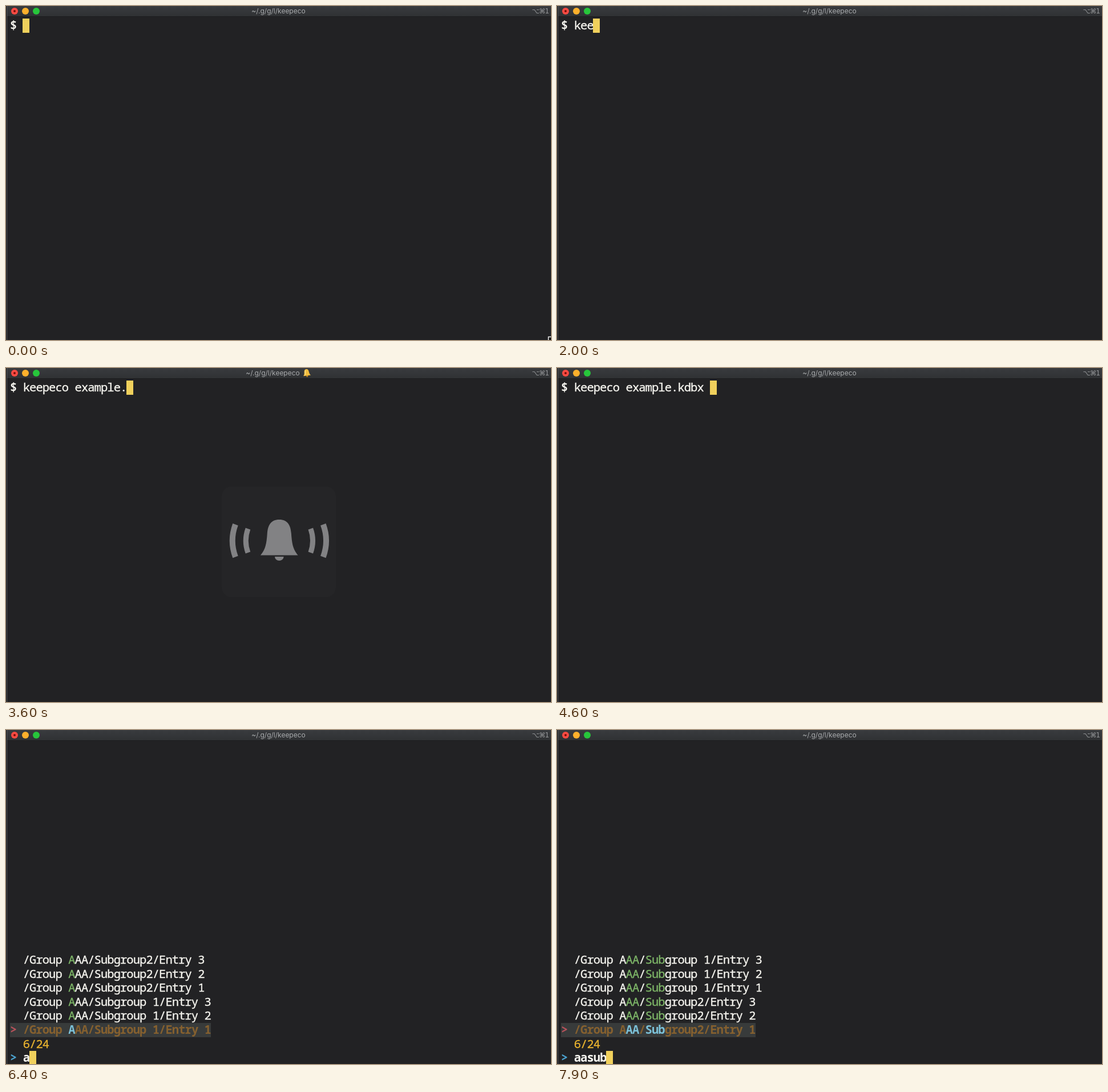
An HTML page for the animation above (8000 ms loop, 955 by 586 pixels).

```html
<!DOCTYPE html>
<html lang="en">
<head>
<meta charset="utf-8">
<title>Terminal</title>
<style>
  html, body { margin: 0; width: 100%; height: 100%; overflow: hidden; background: #222224; }
  #win { position: absolute; left: 0; top: 0; width: 955px; height: 586px; overflow: hidden; background: #222224; }
  #edge { position: absolute; left: 0; top: 0; width: 1px; height: 586px; background: #0d0d0e; border-right: 1px solid #58595b; }
  #bar { position: absolute; left: 2px; right: 0; top: 0; height: 18px; background: linear-gradient(#393b3e, #303234); border-bottom: 1px solid #1c1c1e; }
  #title { position: absolute; left: 0; width: 955px; top: 0; height: 18px; display: flex; justify-content: center; align-items: center;
    font: 12px/18px Inter, "Liberation Sans", sans-serif; color: #a9abad; white-space: pre; }
  #title svg { display: none; margin-left: 4px; }
  #title.rung svg { display: block; }
  #keys { position: absolute; right: 4px; top: 0; font: 11.5px/18px "DejaVu Sans", sans-serif; color: #96989a; letter-spacing: -.9px; }
  .light { position: absolute; top: 2.5px; width: 12px; height: 12px; border-radius: 50%; }
  .light i { position: absolute; left: 4px; top: 4px; width: 4px; height: 4px; border-radius: 50%; background: #7a0e09; }
  #art { position: absolute; left: 0; top: 0; }
  .row { position: absolute; left: 7px; height: 24.6px; white-space: pre; color: #f7f6f0;
    font: 500 20.5px/23.6px "Noto Sans Mono", "DejaVu Sans Mono", monospace; font-stretch: semi-condensed;
    -webkit-text-stroke: .35px; }
  .row b, .sel, .ask { font-weight: 700; -webkit-text-stroke: 0; }
  .cur { position: absolute; top: 0; width: 12px; height: 24.6px; background: #f0d05c; }
  .sel { background: #383b3b; color: #85602f; }
  .sel .mark { color: #b9525b; }
  .hit { color: #7db567; }
  .sel .hit { color: #7cc1d8; }
  .count { color: #e9b32f; }
  .ask { color: #4ba3d0; }
</style>
</head>
<body>
<div id="win">
  <div id="bar"></div>
  <div id="edge"></div>
  <div class="light" style="left:9px;background:#fc4a42"><i></i></div>
  <div class="light" style="left:28px;background:#fdb02c"></div>
  <div class="light" style="left:47px;background:#27c63b"></div>
  <div id="title"><span>~/.g/g/l/keepeco</span><svg width="16" height="16" viewBox="0 0 16 16">
    <g transform="rotate(-8 8 8)"><circle cx="8" cy="13.4" r="1.7" fill="#b07a1c"/>
    <path d="M8 1C4.6 1 4 4 3.8 7 3.6 9.5 2.8 10.5 1.5 12.5H14.5C13.2 10.5 12.4 9.5 12.2 7 12 4 11.4 1 8 1Z" fill="#f3bd3e"/>
    <path d="M6.5 3C5.5 4.5 5.5 8 4.8 11" fill="none" stroke="#fbe08c" stroke-width="1.3"/></g></svg></div>
  <div id="keys">⌥⌘1</div>
  <div id="screen"></div>
  <svg id="art" width="955" height="586">
    <g id="bell">
      <rect x="378" y="208" width="200" height="194" rx="17" fill="#252527"/>
      <g fill="#828284">
        <path d="M478.8 266C464 266 459 276 457.8 290C456.5 308 455 318 446 328.5H511.6C502.6 318 501.1 308 499.8 290C498.6 276 493.6 266 478.8 266Z"/>
        <path d="M471 331H486.600A7.8 7 0 0 1 471 331Z"/>
      </g>
      <g id="waves" fill="none" stroke="#828284">
        <path d="M402 274.5Q391.5 303 402 331.5" stroke-width="10"/>
        <path d="M424 282Q416.5 303 424 324" stroke-width="9"/>
      </g>
      <use href="#waves" transform="matrix(-1 0 0 1 957.8 0)"/>
    </g>
    <path id="pointer" d="M950.5 580.5H956V587H950.5Z" fill="#111" stroke="#f2f2f2" stroke-width="1.5"/>
  </svg>
</div>
<script>
const LOOP = 8000, CELL = 11.352, LINE = 24.6, TOP = 22;
const $ = id => document.getElementById(id);
const screen = $('screen'), bell = $('bell'), pointer = $('pointer'), title = $('title');

// Shell input: [time, characters of the command shown]
const command = 'keepeco example.kdbx ';
const typed = [[0, 0], [1400, 1], [1700, 2], [1900, 3], [2100, 4], [2300, 5], [2400, 6], [2600, 7],
  [2700, 8], [2900, 9], [3000, 10], [3200, 11], [3400, 12], [3600, 16], [4300, 17], [4500, 21]];
const ENTER = 5100, LIST = 5400;
const queries = [[LIST, ''], [5900, 'a'], [7000, 'aa'], [7700, 'aas'], [7800, 'aasu'], [7900, 'aasub']];

const entries = [];
for (const g of ['CCC', 'BBB', 'AAA'])
  for (const s of ['Subgroup2/', 'Subgroup 1/', ''])
    if (g !== 'AAA' || s)
      for (let n = 3; n; n--) entries.push(`/Group ${g}/${s}Entry ${n}`);

const last = (steps, t) => steps.reduce((v, s) => t >= s[0] ? s[1] : v, steps[0][1]);
const row = (n, html, cls = '') =>
  `<div class="row ${cls}" style="top:${(TOP + n * LINE).toFixed(1)}px">${html}</div>`;
const cursor = col => `<i class="cur" style="left:${(col * CELL - .4).toFixed(1)}px"></i>`;
const hit = s => s ? `<span class="hit">${s}</span>` : '';

// Set the letter pitch to the terminal's cell width
function fitPitch() {
  screen.innerHTML = row(0, '0'.repeat(20));
  const advance = screen.firstChild.getBoundingClientRect().width / 20;
  screen.style.letterSpacing = (CELL - advance).toFixed(3) + 'px';
}

function mark(path, q) {
  if (!q) return path;
  const a = Math.min(q.length, 2), sub = q.length - a;
  const from = sub ? 8 : 7;
  return path.slice(0, from) + hit(path.substr(from, a)) + path.slice(from + a, 11) +
    hit(path.substr(11, sub)) + path.slice(11 + sub);
}

function shell(t) {
  const n = last(typed, t), done = t >= ENTER;
  return row(0, '<b>$</b> ' + command.slice(0, n) + (done ? '' : cursor(n + 2))) +
    (done ? row(1, cursor(0)) : '');
}

function finder(q) {
  let found = q ? entries.filter(e => e.includes('AAA')) : entries;
  if (q.length > 2) found = [...found.slice(3), ...found.slice(0, 3)];
  const shown = found.slice(-21), end = shown.length - 1;
  return shown.map((e, i) => i === end
    ? row(20, '<span class="mark">&gt;</span> ' + mark(e, q), 'sel')
    : row(20 - end + i, '  ' + mark(e, q))).join('') +
    row(21, `  ${found.length}/${entries.length}`, 'count') +
    row(22, `<span class="ask">&gt;</span> <b>${q}</b>` + cursor(q.length + 2));
}

let shownHtml = '';
function draw(t) {
  const html = t < LIST ? shell(t) : finder(last(queries, t));
  if (html !== shownHtml) screen.innerHTML = shownHtml = html;
  pointer.style.display = t < 900 ? '' : 'none';
  title.className = t >= 3600 && t < 4300 ? 'rung' : '';
  bell.style.opacity = t < 3600 ? 0 : Math.max(0, Math.min(1, (4200 - t) / 450));
}

const start = performance.now();
function tick() {
  draw((performance.now() - start) % LOOP);
  requestAnimationFrame(tick);
}
fitPitch();
draw(0);
requestAnimationFrame(tick);
</script>
</body>
</html>
```
